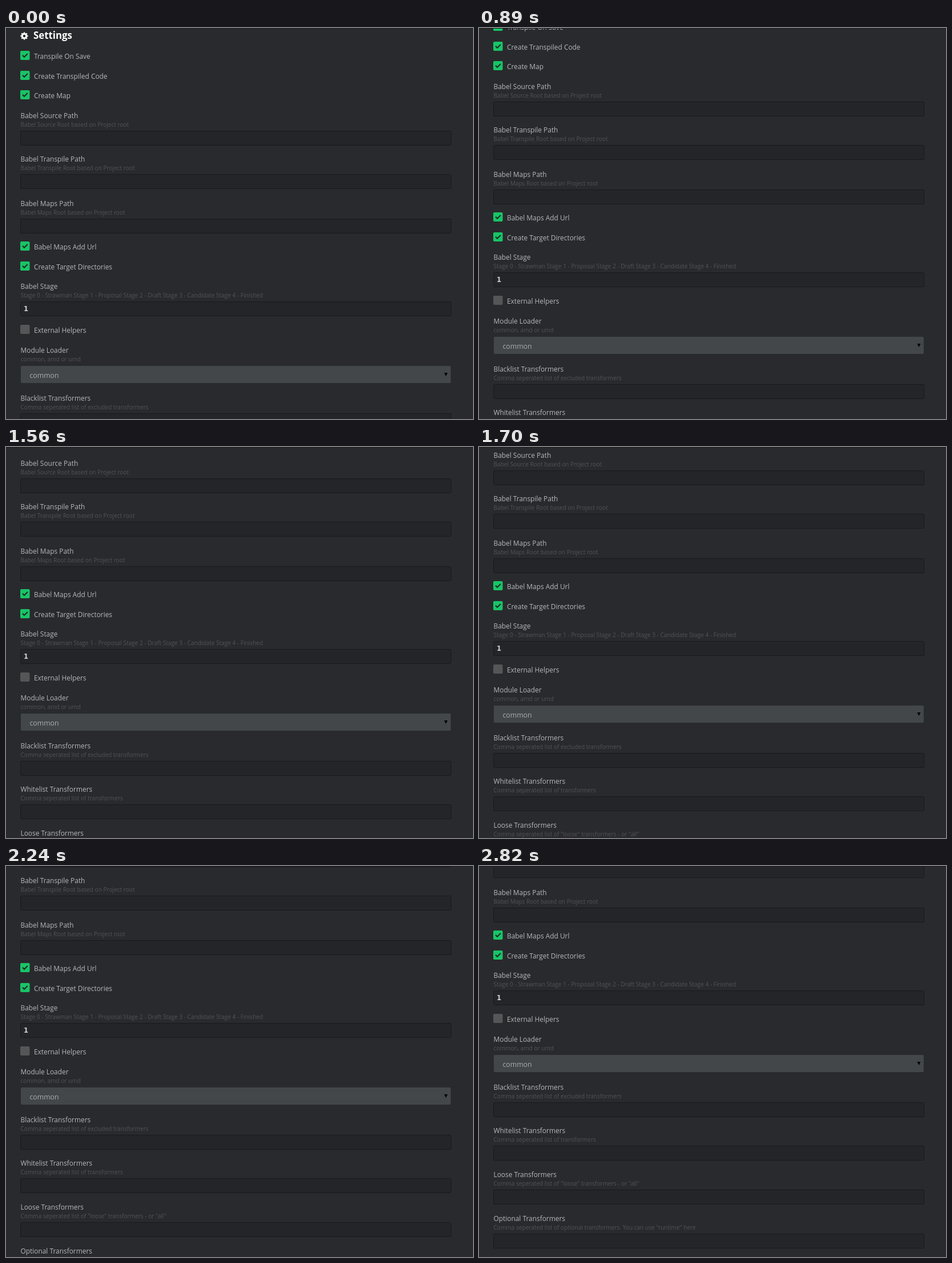
Recreate the animation shown at these times as an HTML page. Size 818 px wide and 685 px high, loop 8000 ms.

```html
<!DOCTYPE html>
<html lang="en">
<head>
<meta charset="utf-8">
<title>Settings</title>
<style>
  html, body { margin: 0; width: 100%; height: 100%; overflow: hidden; background: #292a2d; }
  svg { display: block; font-family: "Open Sans", "Noto Sans", sans-serif; }
  .title { font-size: 16.85px; font-weight: 700; fill: #fff; }
  .label { font-size: 11.9px; fill: #b5b7b9; }
  .hint { font-size: 10.1px; fill: #525355; }
  .value { font: 700 11.5px "DejaVu Sans", sans-serif; fill: #d0d1d2; }
  .choice { font-size: 12.25px; fill: #abadaf; }
  .field { fill: #242528; stroke: #18191b; }
  .select { fill: #43474a; }
  .on { fill: #19c467; }
  .off { fill: #555657; }
  .tick { fill: none; stroke: #1d2b25; stroke-width: 2.1; }
  .gear { fill: none; stroke: #fff; }
</style>
</head>
<body>
<svg width="818" height="685" viewBox="0 0 818 685">
  <g id="page">
    <g class="gear" transform="translate(32 14)">
      <circle r="3.8" stroke-width="3.2"/>
      <circle r="5.7" stroke-width="2" pathLength="16" stroke-dasharray="1 1" stroke-dashoffset=".5"/>
    </g>
    <text class="title" x="48" y="19">Settings</text>
  </g>
  <rect width="818" height="1" fill="#1a1b1d"/>
</svg>
<script>
const page = document.getElementById('page');
const NS = 'http://www.w3.org/2000/svg';

function add(tag, attrs, text = '') {
  const el = document.createElementNS(NS, tag);
  for (const name in attrs) el.setAttribute(name, attrs[name]);
  el.textContent = text;
  page.append(el);
}

const write = (cls, x, y, text) => add('text', { class: cls, x, y }, text);

function checkbox(y, text, checked = true) {
  add('rect', { class: checked ? 'on' : 'off', x: 25, y: y - 14, width: 16.5, height: 16, rx: 2 });
  if (checked) add('path', { class: 'tick', d: `M29 ${y - 6.2}l3 3l5.8-5.8` });
  write('label', 49, y, text);
}

function heading(y, text, hint) {
  write('label', 25.5, y, text);
  write('hint', 25.5, y + 15, hint);
}

function field(y, text, hint, value = '') {
  heading(y, text, hint);
  add('rect', { class: 'field', x: 25.5, y: y + 22.5, width: 754, height: 25, rx: 2 });
  write('value', 31, y + 39, value);
}

function select(y, text, hint, value) {
  heading(y, text, hint);
  add('rect', { class: 'select', x: 26, y: y + 23, width: 753, height: 30, rx: 2 });
  write('choice', 41.5, y + 44, value);
  add('path', { d: `M767.5 ${y + 35}h6l-3 6z` });
}

checkbox(54, 'Transpile On Save');
checkbox(89, 'Create Transpiled Code');
checkbox(123, 'Create Map');
field(158, 'Babel Source Path', 'Babel Source Root based on Project root');
field(234, 'Babel Transpile Path', 'Babel Transpile Root based on Project root');
field(312, 'Babel Maps Path', 'Babel Maps Root based on Project root');
checkbox(388, 'Babel Maps Add Url');
checkbox(423, 'Create Target Directories');
field(457, 'Babel Stage', 'Stage 0 - Strawman Stage 1 - Proposal Stage 2 - Draft Stage 3 - Candidate Stage 4 - Finished', '1');
checkbox(534, 'External Helpers', false);
select(569, 'Module Loader', 'common, amd or umd', 'common');
field(653, 'Blacklist Transformers', 'Comma seperated list of excluded transformers');
field(729, 'Whitelist Transformers', 'Comma seperated list of transformers');
field(806, 'Loose Transformers', 'Comma seperated list of "loose" transformers - or "all"');
field(883, 'Optional Transformers', 'Comma seperated list of optional transformers. You can use "runtime" here');

// [time in ms, scroll offset in px]; the page jumps from stop to stop
const stops = [
  [0, 0], [500, 12], [620, 25], [740, 38], [890, 51], [1160, 70],
  [1280, 88], [1430, 107], [1560, 125], [1700, 139], [1820, 154], [1970, 168],
  [2120, 186], [2240, 204], [2400, 222], [2520, 235], [2670, 248], [2820, 261],
];

function draw() {
  const time = performance.now() % 8000;
  const [, scroll] = stops.findLast(([start]) => start <= time);
  page.setAttribute('transform', `translate(0 ${-scroll})`);
  requestAnimationFrame(draw);
}
draw();
</script>
</body>
</html>
```
